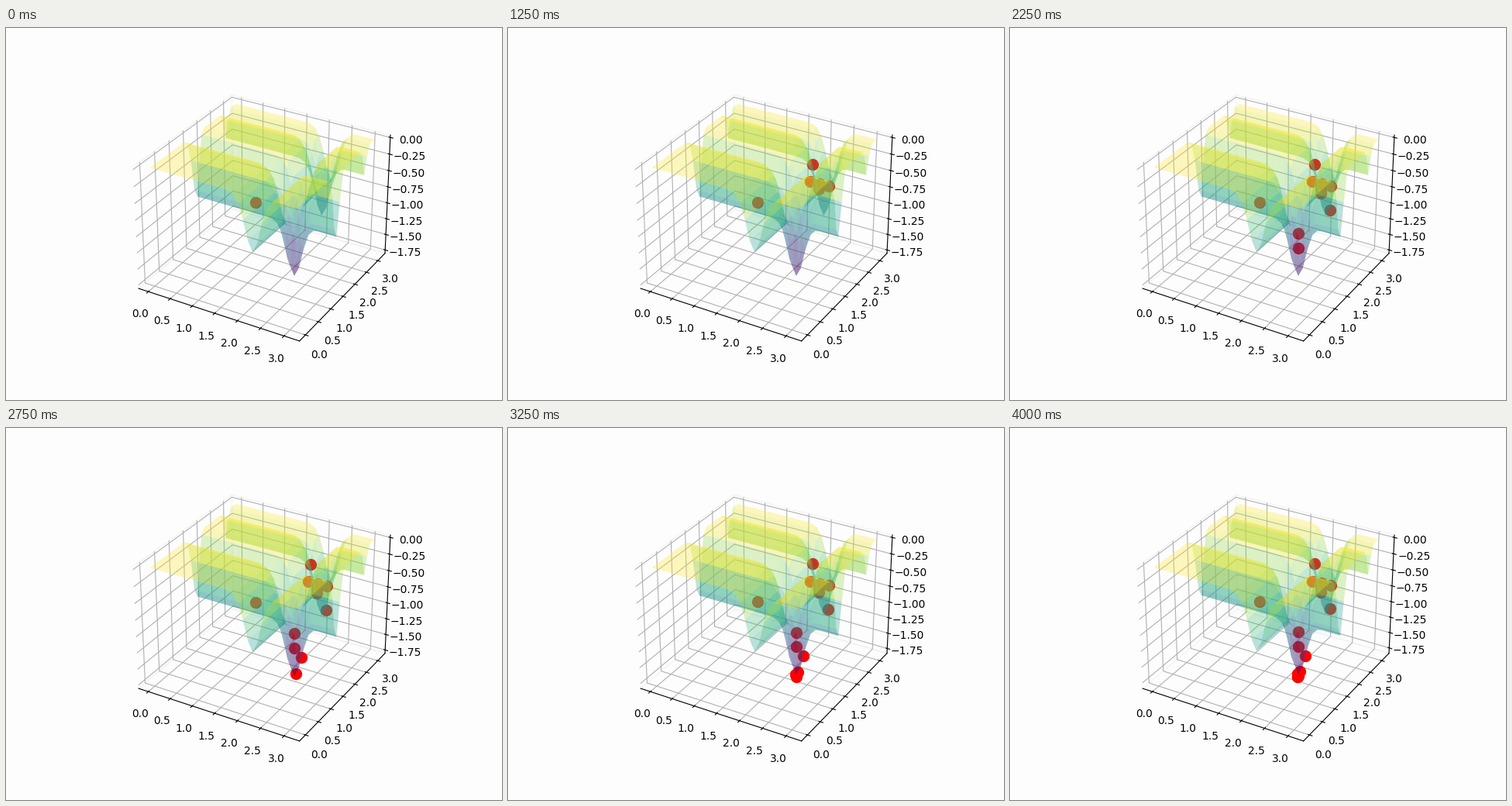
A matplotlib script that plays this animation: 640 px wide and 480 px high, repeating every 4.25 s.

```python
import matplotlib.pyplot as plt
import numpy as np
from matplotlib.animation import FuncAnimation

STEP_MS = 250
BG = "#fdfdfd"
BEST = np.array([2.203, 1.571])


def valley(v, i):
    return -np.sin(v) * np.sin(i * v ** 2 / np.pi) ** 20


def height(x, y):
    return valley(x, 1) + valley(y, 2)


def padded(lo, hi, margin=0.0):
    """Widen a range by its margin, then by 1/48 on each side."""
    m = (hi - lo) * margin
    lo, hi = lo - m, hi + m
    p = (hi - lo) / 48
    return lo - p, hi + p


def search_path():
    """Guess, wander around the side valley, dive, settle at the minimum."""
    guess = [(1.391, 1.484), (1.899, 2.752)]
    ridge = np.linspace((2.342, 2.218), (2.274, 2.348), 3)
    side = [(2.075, 2.338), (2.336, 2.620), (2.285, 2.715)]
    wander = np.stack([ridge, side], axis=1).reshape(-1, 2)
    dive = [(2.126, 1.706), (2.147, 1.677), (2.360, 1.597)]
    k = np.arange(6)
    swing = np.column_stack([0.02 * (-1.0) ** k, np.full(6, 0.04)])
    settle = BEST + swing * (1 - k[:, None] / 5) ** 2
    x, y = np.vstack([guess, wander, dive, settle]).T
    return np.column_stack([x, y, height(x, y)])


path = search_path()
axis = np.arange(0, np.pi, 0.1)
X, Y = np.meshgrid(axis, axis)
Z = height(X, Y)

fig = plt.figure(figsize=(6.4, 4.8), dpi=100, facecolor=BG)
ax = fig.add_subplot(projection="3d", facecolor=BG)
for a in (ax.xaxis, ax.yaxis, ax.zaxis):
    a.pane.set_fill(False)
    a.pane.set_edgecolor("#ececec")

ax.plot_surface(X, Y, Z, cmap="viridis", alpha=0.3, linewidth=0)
dots, = ax.plot([], [], [], "ro", markersize=10)
ax.set_xlim(*padded(0, axis[-1], 0.05))
ax.set_ylim(*padded(0, axis[-1], 0.05))


def update(i):
    seen = path[:i + 1]
    dots.set_data_3d(*seen.T)
    ax.set_zlim(*padded(min(Z.min(), seen[:, 2].min()), 0))
    return dots,


anim = FuncAnimation(fig, update, frames=len(path), interval=STEP_MS,
                     repeat=True, repeat_delay=0)
plt.show()
```
